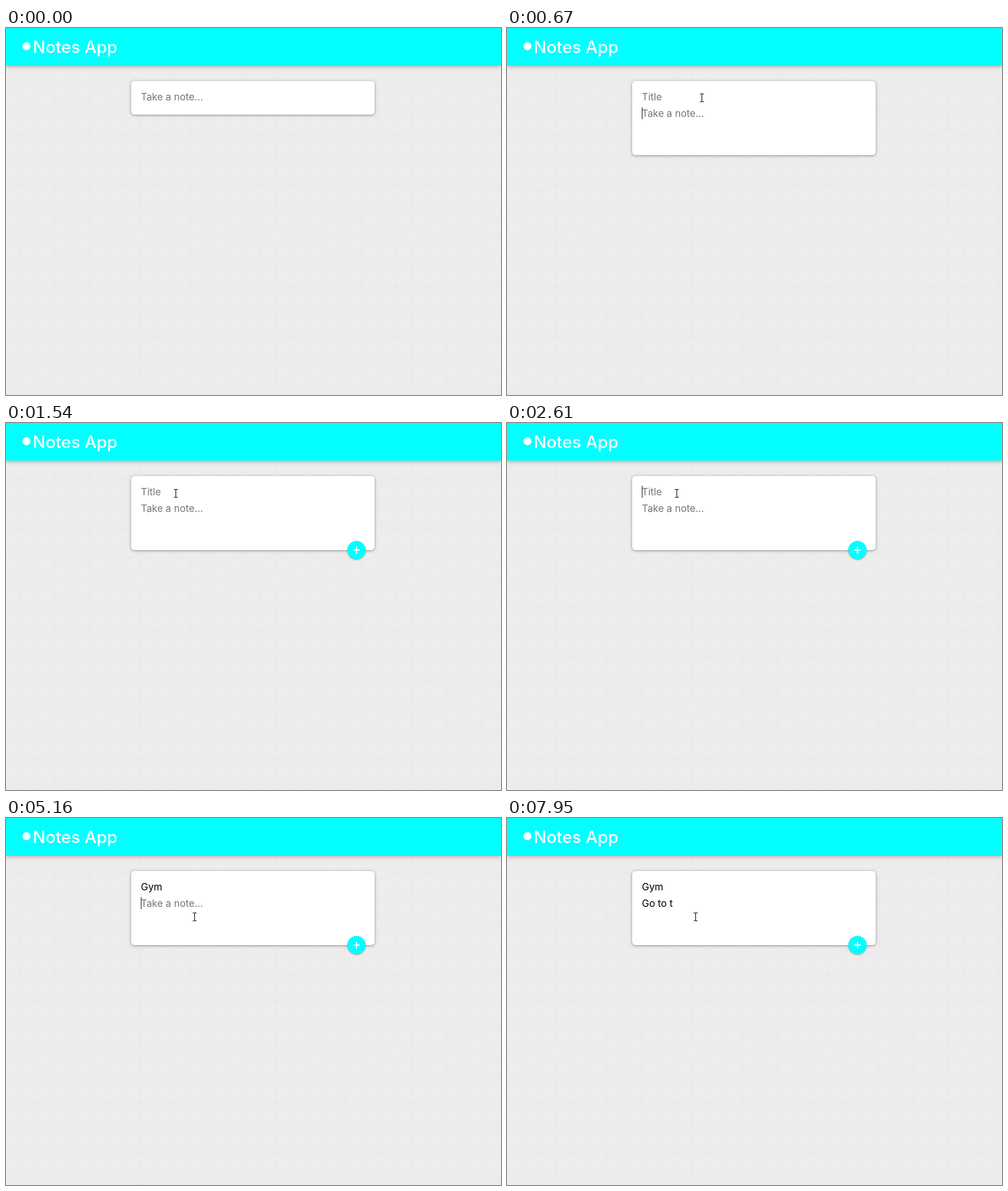
An HTML page that plays this animation: 870x644 px, repeating every 8 s.

```html
<!DOCTYPE html>
<html lang="en">
<head>
<meta charset="utf-8">
<title>Notes</title>
<style>
  html, body { margin: 0; width: 100%; height: 100%; overflow: hidden; background: #ededed; }
  body { position: relative; font: 17.3px/21px Inter, Roboto, sans-serif; }
  body > *, .field, #add { position: absolute; }
  #grid { left: 0; top: 0; }
  header { left: 0; top: 0; width: 100%; height: 66px; background: #0ff; box-shadow: 0 1px 8px rgba(0, 0, 0, .35); }
  h1 { position: absolute; left: 47px; top: 13px; margin: 0; font-weight: 500; font-size: 29.6px; line-height: 40px; color: #fff; }
  #mark { position: absolute; left: 29px; top: 25px; width: 14px; height: 14px; border-radius: 50%; background: #fff; }
  #card { left: 220px; top: 93px; width: 428px; background: #fff; border-radius: 6px; box-shadow: 0 1px 5px #8a8989; }
  .field { left: 17px; height: 21px; white-space: pre; color: #000; }
  .caret { position: absolute; top: 0; width: 1px; height: 21px; background: #000; }
  .hint { color: #757575; }
  .typo { text-decoration: underline wavy #e33 1px; text-underline-offset: 1px; }
  #add { left: 380px; top: 114px; width: 32px; height: 32px; border-radius: 50%; background: #0ff; box-shadow: 0 1px 3px rgba(0, 0, 0, .35); }
  #add svg { display: block; }
  #pointer { left: 0; top: 0; overflow: visible; }
</style>
</head>
<body>
<svg id="grid" width="870" height="644">
  <pattern id="cubes" x="26" y="97.5" width="59.86" height="89.28" patternUnits="userSpaceOnUse">
    <path id="edges" fill="none" stroke="#e7e7e7"/>
  </pattern>
  <rect width="870" height="644" fill="url(#cubes)"/>
</svg>
<header><div id="mark"></div><h1>Notes App</h1></header>
<div id="card">
  <div class="field" id="title"><span class="text"></span><span class="word"></span><i class="caret"></i><span class="hint"></span></div>
  <div class="field" id="note"><span class="text"></span><span class="word"></span><i class="caret"></i><span class="hint"></span></div>
  <div id="add"><svg width="32" height="32"><path d="M16 10v12M10 16h12" stroke="#fff" stroke-width="1.8"/></svg></div>
</div>
<svg id="pointer" width="1" height="1">
  <path id="arrow" d="M0 0V16L3.7 12.5 6.2 18.5 8.8 17.4 6.3 11.6H11.3Z" fill="#000" stroke="#fff"/>
  <g id="beam" fill="none">
    <path d="M-3.5-7H-1L0-6 1-7H3.5M0-6V6M-3.5 7H-1L0 6 1 7H3.5" stroke="#fff" stroke-width="2.4"/>
    <path d="M-3.5-7H-1L0-6 1-7H3.5M0-6V6M-3.5 7H-1L0 6 1 7H3.5" stroke="#111" stroke-width="1.2"/>
  </g>
</svg>
<script>
const LOOP = 8000, STEP = 67, EXPAND = 670;
const $ = id => document.getElementById(id);

// Isometric cubes: flat rhombi joined by vertical edges
const w = 29.93, h = 44.64, r = 11;
$('edges').setAttribute('d',
  `M0 0L${w} ${r} ${2 * w} 0M0 ${2 * h}L${w} ${2 * h - r} ${2 * w} ${2 * h}` +
  `M0 ${h - r}L${w} ${h} ${2 * w} ${h - r}M0 ${h + r}L${w} ${h} ${2 * w} ${h + r}` +
  `M${w} ${r}V${2 * h - r}` +
  [0, 2 * w].map(x => `M${x} 0V${h - r}M${x} ${h + r}V${2 * h}`).join(''));

// [time, text]
const titleKeys = [[0, ''], [3750, 'G'], [4020, 'Gy'], [4220, 'Gym']];
const noteKeys = [[0, ''], [6020, 'G'], [6150, 'Go'], [6350, 'Go '], [6490, 'Go t'], [6630, 'Go to'],
  [6830, 'Go to '], [6890, 'Go to t'], [7030, 'Go to tg'], [7160, 'Go to tge'], [7290, 'Go to tge '],
  [7620, 'Go to tge'], [7820, 'Go to tg'], [7950, 'Go to t']];

// [from, to] while the caret is lit
const titleCaret = [[1550, 2080], [2610, 3150], [3680, 4750]];
const noteCaret = [[540, 1070], [5090, 5620], [6020, 7950]];

// [time, x, y]
const path = [[70, 727, 553], [200, 575, 345], [335, 428, 188], [470, 351, 128], [540, 342, 122], [870, 342, 122],
  [938, 349, 124], [1005, 358, 127], [1072, 350, 113], [1139, 326, 103], [1206, 302, 102], [1330, 302, 102],
  [1410, 301, 111], [1541, 298, 123], [4755, 298, 123], [4824, 314, 150], [4891, 329, 172],
  [5020, 329, 172], [5092, 335, 175], [5159, 331, 173]];

const textAt = (keys, t) => keys.filter(k => k[0] <= t).pop()[1];
const lit = (spans, t) => spans.some(([from, to]) => t >= from && t < to);
const show = (el, on) => { el.style.visibility = on ? 'visible' : 'hidden'; };

function pointAt(t) {
  const i = path.findIndex(p => p[0] > t);
  if (i < 0) return path[path.length - 1].slice(1);
  if (i === 0) return path[0].slice(1);
  const [t0, x0, y0] = path[i - 1], [t1, x1, y1] = path[i];
  const k = (t - t0) / (t1 - t0);
  return [x0 + (x1 - x0) * k, y0 + (y1 - y0) * k];
}

function drawField(id, text, hint, caretOn, misspelt) {
  const [before, word, caret, tip] = $(id).children;
  const cut = misspelt ? text.trimEnd().lastIndexOf(' ') + 1 : text.length;
  before.textContent = text.slice(0, cut);
  word.innerHTML = misspelt ? `<span class="typo">${text.slice(cut).trimEnd()}</span> ` : '';
  tip.textContent = text ? '' : hint;
  show(caret, caretOn);
}

function draw(t) {
  const open = t >= EXPAND;
  $('card').style.height = (open ? 130 : 59) + 'px';
  show($('title'), open);
  $('title').style.top = '17px';
  $('note').style.top = open ? '45.5px' : '17px';
  drawField('title', textAt(titleKeys, t), 'Title', open && lit(titleCaret, t), false);
  drawField('note', textAt(noteKeys, t), 'Take a note...', lit(noteCaret, t), t >= 7360 && t < 7620);

  const k = Math.min(1, Math.max(0, (t - 640) / 230));
  $('add').style.transform = `scale(${open ? k * k * (3 - 2 * k) : 0})`;

  const [x, y] = pointAt(Math.floor(t / STEP) * STEP);
  const inside = x > 220 && x < 648 && y > 93 && y < (open ? 223 : 152);
  $('pointer').style.transform = `translate(${Math.round(x) + .5}px, ${Math.round(y) + .5}px)`;
  show($('arrow'), t >= 70 && !inside);
  show($('beam'), t >= 70 && inside);
}

const start = performance.now();
function frame() {
  draw((performance.now() - start) % LOOP);
  requestAnimationFrame(frame);
}
draw(0);
requestAnimationFrame(frame);
</script>
</body>
</html>
```
